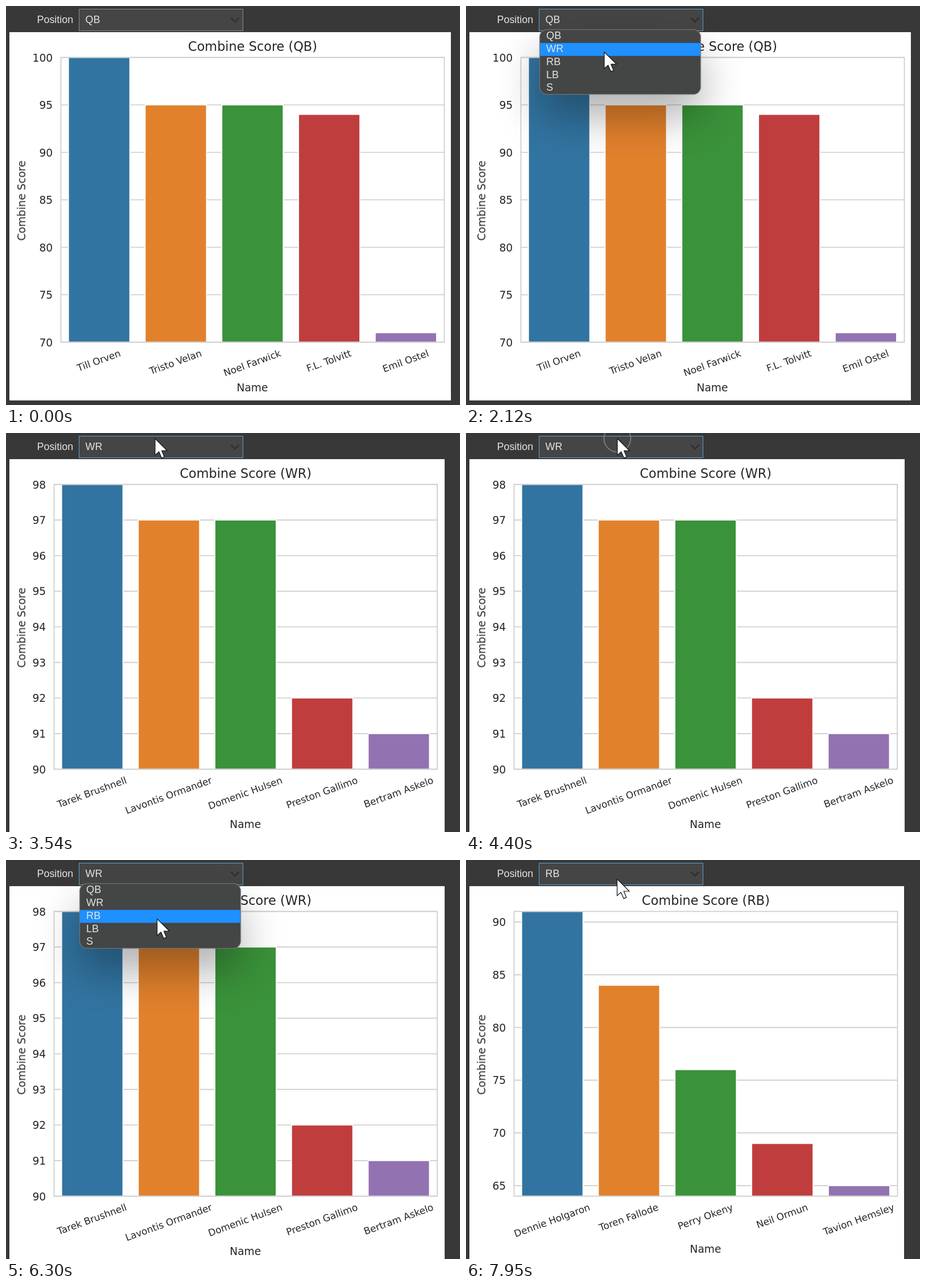
Recreate the animation shown at these times as an HTML page. Size 798x702 px, loop 8 s.

```html
<!DOCTYPE html>
<html lang="en">
<head>
<meta charset="utf-8">
<title>Score by position</title>
<style>
  html, body { margin: 0; width: 100%; height: 100%; overflow: hidden; background: #383838; }
  svg { display: block; width: 100vw; height: 100vh; }
  .figure { filter: blur(.4px); }
  .plot text { font-family: "DejaVu Sans", sans-serif; font-size: 18.66px; fill: #262626; }
  .plot .title { font-size: 22.4px; }
  .plot .name { font-size: 16.8px; }
  .ui text { font-family: "Liberation Sans", Arial, sans-serif; font-size: 17.9px; fill: #e4e4e4; }
  .ui .item { font-size: 18.2px; }
</style>
</head>
<body>
<svg id="stage" viewBox="0 0 798 702" xmlns="http://www.w3.org/2000/svg"></svg>
<script>
const LOOP = 8000;
const POSITIONS = ["QB", "WR", "RB", "LB", "S"];
const COLORS = ["#3274a1", "#e1812c", "#3a923a", "#c03d3e", "#9372b2"];
const AXES = { top: 90.5, bottom: 591.5 };
const MENU = { x: 129.5, y: 41.5, width: 283, height: 114, rx: 13 };
const ROW = 22.75, ROWS_TOP = 42.3;

const CHARTS = [
  { position: "QB", pageRight: 782, pageBottom: 694, left: 96.5, right: 770.5, min: 70, max: 100,
    tickFrom: 70, tickStep: 5, nameY: 677.5, scores: [100, 95, 95, 94, 71],
    names: ["Till Orven", "Tristo Velan", "Noel Farwick", "F.L. Tolvitt", "Emil Ostel"] },
  { position: "WR", pageRight: 771, pageBottom: 710, left: 84.5, right: 758, min: 90, max: 98,
    tickFrom: 90, tickStep: 1, nameY: 694.5, scores: [98, 97, 97, 92, 91],
    names: ["Tarek Brushnell", "Lavontis Ormander", "Domenic Hulsen", "Preston Gallimo", "Bertram Askelo"] },
  { position: "RB", pageRight: 770, pageBottom: 710, left: 84.5, right: 758.5, min: 64, max: 91,
    tickFrom: 65, tickStep: 5, nameY: 690.5, scores: [91, 84, 76, 69, 65],
    names: ["Dennie Holgaron", "Toren Fallode", "Perry Okeny", "Neil Ormun", "Tavion Hemsley"] }
];

// Pointer path: time, x, y
const PATH = [
  [70, 612, 614], [270, 500, 420], [470, 370, 200], [640, 275, 60], [810, 244, 21], [1000, 243, 26.5],
  [1400, 243, 26.5], [1730, 243, 49], [2120, 243, 81], [3190, 243, 81], [3540, 262, 9.8],
  [3740, 263.6, 9.8], [3950, 266, 9.8], [5140, 266, 9.8], [5480, 268, 38], [5890, 266, 80],
  [6230, 265.6, 103.6], [7580, 265.6, 103.6], [7950, 265.6, 33.6]
];
const CLICKS = [[1210, 1270], [2650, 2790], [4400, 4470], [6430, 6500]];
const FRAME_ONLY = [[1270, 1400], [4470, 4540]];
const OPEN = [[1270, 2790], [4470, 6570]];
const FADE_FROM = 6500;

const stage = document.getElementById("stage");

function add(parent, tag, attrs = {}, text) {
  const node = document.createElementNS("http://www.w3.org/2000/svg", tag);
  for (const key in attrs) node.setAttribute(key, attrs[key]);
  if (text !== undefined) node.textContent = text;
  parent.appendChild(node);
  return node;
}

function drawChart(chart) {
  const { left, right, min, max } = chart;
  const plot = add(stage, "g", { class: "plot" });
  const mid = (left + right) / 2;
  const slot = (right - left) / 5;
  const yOf = v => AXES.bottom - (v - min) / (max - min) * (AXES.bottom - AXES.top);

  add(plot, "rect", { x: 6, y: 46, width: chart.pageRight - 6, height: chart.pageBottom - 46, fill: "#fff" });
  const g = add(plot, "g", { class: "figure" });
  for (let v = chart.tickFrom; v <= max; v += chart.tickStep) {
    const y = yOf(v);
    add(g, "path", { d: `M${left} ${y}H${right}`, stroke: "#ccc", "stroke-width": 1.7 });
    add(g, "text", { x: left - 14.3, y: y + 7, "text-anchor": "end" }, v);
  }
  chart.scores.forEach((score, i) => {
    const cx = left + slot * (i + .5) - .2, y = yOf(score);
    add(g, "rect", { x: cx - slot * .4, y, width: slot * .8, height: AXES.bottom - y,
      fill: COLORS[i], stroke: "#fff", "stroke-width": 1.7 });
    const label = add(g, "text", { class: "name", y: 4.3, "text-anchor": "middle" }, chart.names[i]);
    const tilt = 20 * Math.PI / 180;
    const drop = (label.getComputedTextLength() * Math.sin(tilt) + 16 * Math.cos(tilt)) / 2;
    label.setAttribute("transform", `translate(${cx} ${604 + drop}) rotate(-20)`);
  });
  add(g, "rect", { x: left, y: AXES.top, width: right - left, height: AXES.bottom - AXES.top,
    fill: "none", stroke: "#ccc", "stroke-width": 1.7 });
  add(g, "text", { class: "title", x: mid, y: 78.5, "text-anchor": "middle" }, `Combine Score (${chart.position})`);
  add(g, "text", { x: mid - .5, y: chart.nameY, "text-anchor": "middle" }, "Name");
  add(g, "text", { transform: "translate(34 342.5) rotate(-90)", "text-anchor": "middle" }, "Combine Score");
  return plot;
}

const defs = add(stage, "defs");
const blur = add(defs, "filter", { id: "blur", filterUnits: "userSpaceOnUse", x: 0, y: -60, width: 560, height: 420 });
add(blur, "feGaussianBlur", { stdDeviation: 37 });
const outside = add(defs, "clipPath", { id: "outside" });
add(outside, "path", { "clip-rule": "evenodd",
  d: "M0 0H798V702H0ZM142.5 41.5H399.5a13 13 0 0 1 13 13V142.5a13 13 0 0 1 -13 13H142.5a13 13 0 0 1 -13 -13V54.5a13 13 0 0 1 13 -13Z" });
const inside = add(defs, "clipPath", { id: "inside" });
add(inside, "rect", MENU);

add(stage, "rect", { width: 798, height: 702, fill: "#383838" });
const plots = CHARTS.map(drawChart);

const ui = add(stage, "g", { class: "ui" });
add(ui, "text", { x: 54.5, y: 30.3 }, "Position");
const field = add(ui, "rect", { x: 128.5, y: 5.5, width: 288, height: 38, fill: "#454545" });
const value = add(ui, "text", { x: 139.5, y: 30.3 });
add(ui, "path", { d: "M395.5 21L402.5 28L409.5 21", fill: "none", stroke: "#303030", "stroke-width": 2.6 });

const menu = add(ui, "g");
const shade = add(menu, "g", { "clip-path": "url(#outside)" });
add(shade, "rect", { ...MENU, y: MENU.y + 40, fill: "#000", opacity: .31, filter: "url(#blur)" });
const list = add(menu, "g", { "clip-path": "url(#inside)" });
add(list, "rect", { ...MENU, fill: "#444545" });
const highlight = add(list, "rect", { x: 129, width: 284, height: ROW, fill: "#1e90ff" });
POSITIONS.forEach((p, i) => add(list, "text", { class: "item", x: 141, y: 58.4 + ROW * i }, p));
const menuEdge = add(menu, "rect", { ...MENU, fill: "none", stroke: "#777", "stroke-opacity": .75 });

const ring = add(stage, "circle", { r: 23.5, fill: "none", stroke: "#999", "stroke-width": 2, opacity: .6 });
const pointer = add(stage, "path", { d: "M0 0V29.3L6.8 23.2L11.6 34.3L16.4 32.3L11.8 21.4H21.5Z",
  fill: "#fff", stroke: "#111", "stroke-width": 1.2, "stroke-linejoin": "round" });

const show = (node, on) => node.setAttribute("display", on ? "inline" : "none");
const during = (spans, t) => spans.some(([from, to]) => t >= from && t < to);
const stepAt = (t, first, second) => t < first ? 0 : t < second ? 1 : 2;

function pointerAt(t) {
  const i = PATH.findIndex(key => key[0] > t);
  if (i === 0) return PATH[0].slice(1);
  if (i < 0) return PATH[PATH.length - 1].slice(1);
  const [t0, x0, y0] = PATH[i - 1], [t1, x1, y1] = PATH[i];
  const k = (t - t0) / (t1 - t0);
  return [x0 + (x1 - x0) * k, y0 + (y1 - y0) * k];
}

function render(t) {
  const [x, y] = pointerAt(t);
  const chosen = stepAt(t, 2790, FADE_FROM);
  const current = stepAt(t, 3390, 7780);
  const frameOnly = during(FRAME_ONLY, t);

  plots.forEach((plot, i) => show(plot, i === current));
  value.textContent = POSITIONS[chosen];
  field.setAttribute("stroke", t < 1210 ? "#8c8c8c" : "#5f9fd2");

  show(menu, during(OPEN, t));
  show(list, !frameOnly);
  menu.setAttribute("opacity", t >= FADE_FROM ? .5 : 1);
  menuEdge.setAttribute("stroke-width", frameOnly ? 2.2 : 1.5);
  const row = y < ROWS_TOP ? chosen : Math.floor((y - ROWS_TOP) / ROW);
  highlight.setAttribute("y", ROWS_TOP + ROW * row);

  const place = `translate(${x} ${y})`;
  show(pointer, t >= 70);
  pointer.setAttribute("transform", place);
  show(ring, during(CLICKS, t));
  ring.setAttribute("transform", place);
}

const start = performance.now();
function tick() {
  render((performance.now() - start) % LOOP);
  requestAnimationFrame(tick);
}
tick();
</script>
</body>
</html>
```
